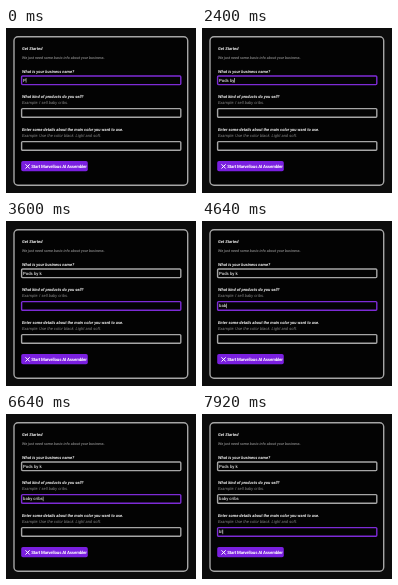
An HTML page that plays this animation: 190 px wide and 165 px high, repeating every 8 s.

```html
<!DOCTYPE html>
<html lang="en">
<head>
<meta charset="utf-8">
<title>Get Started</title>
<style>
  html, body { margin: 0; width: 100%; height: 100%; overflow: hidden; background: #0c0c0c; }
  svg { display: block; width: 190px; height: 165px; }
  text { font: 500 4.3px Roboto, sans-serif; fill: #ddd; white-space: pre; text-rendering: geometricPrecision; }
  .label { font: italic 700 4.1px Roboto, sans-serif; fill: #eee; }
  .intro { font: italic 500 3.75px Roboto, sans-serif; fill: #8c8c8c; }
  .hint { font: italic 400 4.15px Roboto, sans-serif; fill: #858585; }
  .action { font-weight: 700; font-size: 4.4px; letter-spacing: -.17px; fill: #fff; }
  .box { fill: #030303; stroke: #a6a6a6; stroke-width: 1.4; }
  .focus .box { stroke: #7d2bd6; }
  .caret { fill: #ddd; visibility: hidden; }
  .caret.on { visibility: visible; }
  .icon { fill: none; stroke: #fff; stroke-width: 1; }
</style>
</head>
<body>
<svg viewBox="0 0 190 165">
  <rect class="box" x="8" y="8.7" width="173.7" height="148.5" rx="4"/>
  <text class="label" x="16" y="22">Get Started</text>
  <text class="intro" x="16" y="31.2">We just need some basic info about your business.</text>
  <text class="label" x="16" y="44.9">What is your business name?</text>
  <text class="label" x="16" y="69.6">What kind of products do you sell?</text>
  <text class="hint" x="16" y="75.8">Example: I sell baby cribs.</text>
  <text class="label" x="16" y="102.5">Enter some details about the main color you want to use.</text>
  <text class="hint" x="16" y="108.6">Example: Use the color black. Light and soft.</text>
  <g class="field" transform="translate(15.6 48)">
    <rect class="box" width="159.2" height="8.6" rx="1"/><text x="1.4" y="5.6"></text><rect class="caret" y="2" width=".6" height="4.6"/>
  </g>
  <g class="field" transform="translate(15.6 80.6)">
    <rect class="box" width="159.2" height="8.6" rx="1"/><text x="1.4" y="5.6"></text><rect class="caret" y="2" width=".6" height="4.6"/>
  </g>
  <g class="field" transform="translate(15.6 113.6)">
    <rect class="box" width="159.2" height="8.6" rx="1"/><text x="1.4" y="5.6"></text><rect class="caret" y="2" width=".6" height="4.6"/>
  </g>
  <rect x="15.2" y="133" width="66.6" height="10.3" rx="1.8" fill="#7a1fe0"/>
  <path class="icon" d="M19.5 136.3l4.2 4.2m0-4.2l-4.2 4.2"/>
  <text class="action" x="25.2" y="139.8">Start Marvellous AI Assembler</text>
</svg>
<script>
  const LOOP = 8000, BLINK = 500, INSET = 1.4;
  // Each field gains focus at `from`; keys hold the time of each typed letter.
  const entries = [
    { from: 0, text: 'Pods by k', keys: [0, 400, 640, 880, 1360, 1600, 2000, 2560, 2720] },
    { from: 3040, text: 'baby cribs', keys: [3760, 4080, 4480, 4720, 4940, 5760, 6080, 6240, 6400, 6560] },
    { from: 6960, text: 'bl', keys: [7680, 7840] }
  ];
  const fields = [...document.querySelectorAll('.field')];

  function draw(now) {
    const t = now % LOOP;
    entries.forEach(({ from, text, keys }, i) => {
      const [, value, caret] = fields[i].children;
      const typed = keys.filter(k => k <= t);
      const end = i + 1 < entries.length ? entries[i + 1].from : LOOP;
      const focused = t >= from && t < end;
      const last = Math.max(from, ...typed);
      value.textContent = text.slice(0, typed.length);
      caret.setAttribute('x', INSET + value.getComputedTextLength());
      fields[i].classList.toggle('focus', focused);
      caret.classList.toggle('on', focused && (t - last) % (2 * BLINK) < BLINK);
    });
  }

  const start = performance.now();
  function tick() {
    draw(performance.now() - start);
    requestAnimationFrame(tick);
  }
  tick();
</script>
</body>
</html>
```
